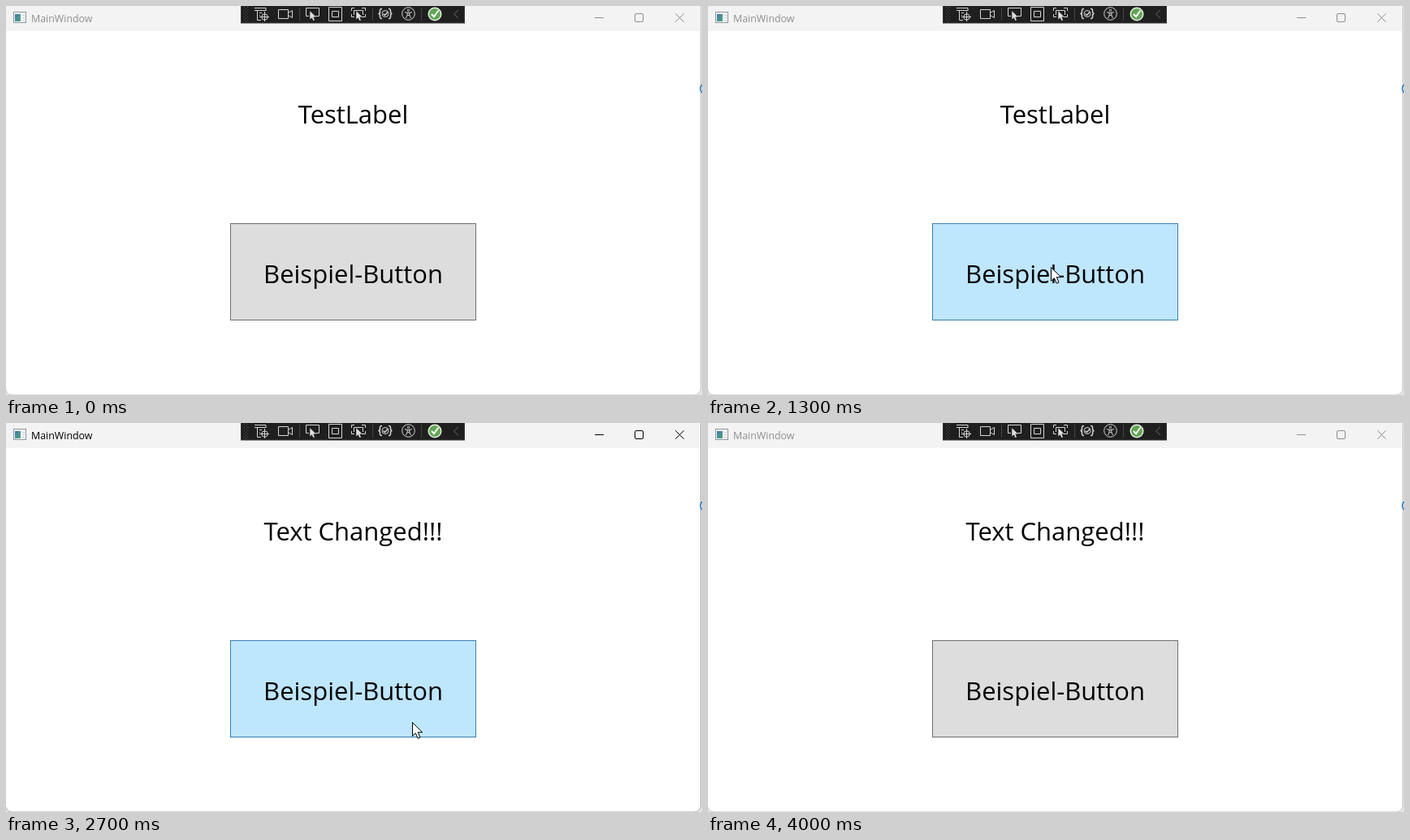
Write an HTML page that moves like this. It is 857x480 px and loops after 4100 ms.

```html
<!DOCTYPE html>
<html lang="de">
<head>
<meta charset="utf-8">
<title>MainWindow</title>
<style>
  html, body { margin: 0; width: 100%; height: 100%; overflow: hidden; background: #e6e6e6; }
  svg { display: block; width: 857px; height: 480px; font-family: "Open Sans", "Noto Sans", sans-serif; }
  .big { font-size: 31px; text-anchor: middle; fill: #000; }
  #caption { fill: none; stroke: #8c8c8c; }
  #title { font-size: 12.4px; fill: #8f8f8f; }
  #frame { fill: #fff; stroke: #c4c4c4; }
  #button { fill: #ddd; stroke: #707070; }
  .active #caption { stroke: #000; }
  .active #title { fill: #000; }
  .active #frame { stroke: #a8a8a8; }
  .hover #button { fill: #bee6fd; stroke: #3c7fb1; }
  .pressed #button { fill: #c4e5f6; stroke: #2c628b; }
  .icons { fill: none; stroke: #d6d6d6; }
</style>
</head>
<body>
<svg id="stage" viewBox="0 0 857 480">
  <defs>
    <path id="arrow" d="M.5 .5V17.3L4.4 13.7L7.2 20.2L10 19L7.3 12.7H12.6Z"/>
    <linearGradient id="teal" x2="1" y2="1">
      <stop stop-color="#3f78b5"/><stop offset="1" stop-color="#4fa578"/>
    </linearGradient>
  </defs>

  <rect id="frame" x="-.5" y="-10" width="856" height="490" rx="8"/>
  <path d="M0 0H852Q855 2 855 7V31H0Z" fill="#f3f3f3"/>
  <path d="M858 97Q855 98 855 102T858 107" fill="none" stroke="#2878bd" stroke-width="1.5"/>

  <rect x="9.5" y="7.5" width="15" height="13" fill="#f8f8f8" stroke="#8b969c"/>
  <rect x="11" y="10" width="7" height="9" fill="url(#teal)"/>
  <path d="M20 11.5h3M20 14.5h3M20 17.5h3" stroke="#c3cbd0"/>
  <text id="title" x="31" y="19.5">MainWindow</text>
  <g id="caption">
    <path d="M725 14.5H736M824.3 9.3L834.7 19.7M834.7 9.3L824.3 19.7"/>
    <rect x="774.5" y="9.5" width="10" height="10" rx="1.5"/>
  </g>

  <rect x="289.5" y="-1" width="275" height="22" fill="#1f1f1f" stroke="#383838"/>
  <path d="M293.5 1V20M297.5 1V20M295.5 3V20" stroke="#555" stroke-dasharray="1 3"/>
  <path d="M361.5 2V18M451.5 2V18M511.5 2V18" stroke="#464646"/>
  <g class="icons">
    <path d="M306 2.5H320V6M306 5.5H320M309.5 5V17.5H314M312 8.5H315M312 11.5H313M318.5 7V19M312 13.5H324"/>
    <circle cx="318.5" cy="13.5" r="3.7"/>
    <path d="M335.5 4.5H347.5V15.5H335.5ZM347.5 8.5L352.5 5.5V14.5L347.5 11.5"/>
    <path d="M373 12.5H369.5V2.5H385.5V12.5H381"/>
    <path d="M397.5 1.5H413.5V18.5H397.5ZM401.5 6.5H409.5V13.5H401.5Z"/>
    <path d="M425.5 6V2.5H429M438 2.5H442.5V6M425.5 10V13.5H429M438 13.5H442.5V10M428.5 11V5.5H439.5V11"/>
    <path d="M463 3.5Q460 3 460.5 7Q460.5 9.5 458.5 9.5Q460.5 9.5 460.5 12Q460 16 463 15.5M471 3.5Q474 3 473.5 7Q473.5 9.5 475.5 9.5Q473.5 9.5 473.5 12Q474 16 471 15.5" stroke-width="1.5"/>
    <circle cx="467" cy="9.5" r="4"/>
    <path d="M464.5 9.5L466.5 11.5L470 7.5" stroke-width="1.4"/>
    <circle cx="495.5" cy="9.5" r="7.8"/>
    <path d="M491 7.5L494 8.5H497L500 7.5M494.2 8.5V11L492.5 15M496.8 8.5V11L498.5 15M494.2 11.5H496.8"/>
    <circle cx="495.5" cy="5.5" r="1.2"/>
    <path d="M557 5L551.5 10L557 15" stroke="#666"/>
  </g>
  <g fill="#e0e0e0">
    <use href="#arrow" transform="translate(374 6) scale(.6)"/>
    <use href="#arrow" transform="translate(431 6) scale(.6)"/>
  </g>
  <circle cx="528" cy="10" r="8.5" fill="#e9eee7"/>
  <circle cx="528" cy="10" r="7" fill="#61a653"/>
  <path d="M524 10L527 13.2L532.5 5.5" fill="none" stroke="#fff" stroke-width="2"/>

  <text id="label" class="big" x="427.5" y="145">TestLabel</text>
  <rect id="button" x="276.5" y="268.5" width="302" height="119"/>
  <text class="big" x="427.5" y="342">Beispiel-Button</text>
  <use id="cursor" href="#arrow" fill="#fff" stroke="#000"/>
</svg>
<script>
  const LOOP = 4100, STEP = 100;
  const [stage, label, cursor] = ["stage", "label", "cursor"].map(id => document.getElementById(id));

  // Pointer path: [time, x, y]; it is visible from the first to the last point.
  const path = [
    [300, 480, 454], [400, 454, 383], [500, 432, 342], [600, 422, 322],
    [2400, 422, 322], [2500, 426, 324], [2600, 450, 337], [2700, 500, 369], [2800, 572, 434]
  ];

  function pointerAt(t) {
    const i = path.findIndex(p => p[0] >= t);
    if (i < 0 || t < path[0][0]) return null;
    const [t1, x1, y1] = path[i], [t0, x0, y0] = path[Math.max(0, i - 1)];
    const k = t1 > t0 ? (t - t0) / (t1 - t0) : 1;
    return [x0 + (x1 - x0) * k, y0 + (y1 - y0) * k];
  }

  function draw(now) {
    const t = Math.floor(now % LOOP / STEP) * STEP;
    const within = (from, to) => t >= from && t < to;
    const point = pointerAt(t);

    stage.classList.toggle("active", within(1800, 3900));
    stage.classList.toggle("hover", within(400, 2800));
    stage.classList.toggle("pressed", within(1800, 1900));
    label.textContent = t < 1900 ? "TestLabel" : "Text Changed!!!";
    cursor.style.display = point ? "" : "none";
    if (point) cursor.setAttribute("transform", `translate(${point})`);
    requestAnimationFrame(draw);
  }
  requestAnimationFrame(draw);
</script>
</body>
</html>
```
